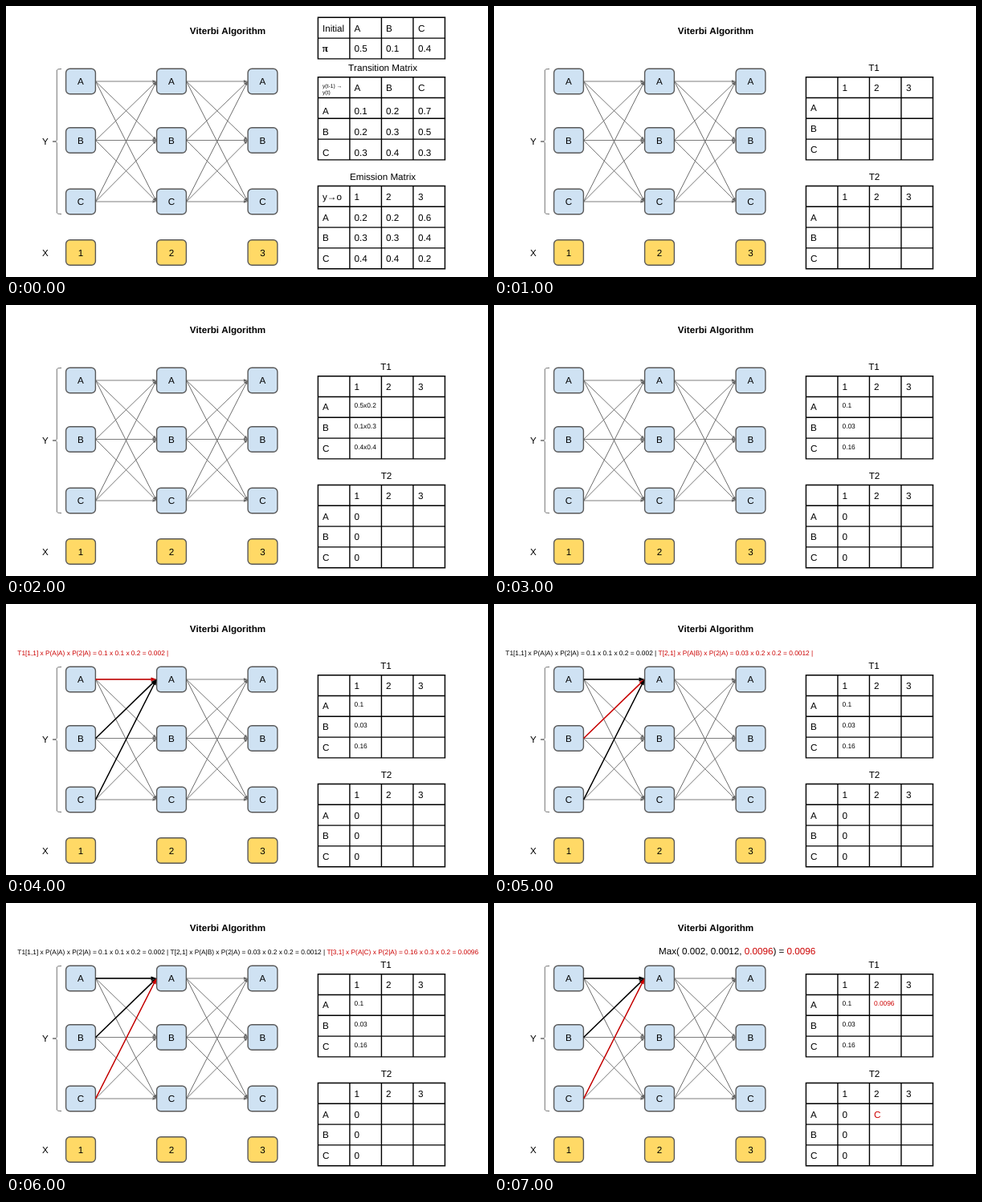
Recreate the animation shown at these times as an HTML page. Size 600 by 338 pixels, loop 8000 ms.

```html
<!DOCTYPE html>
<html lang="en">
<head>
<meta charset="utf-8">
<title>Viterbi Algorithm</title>
<style>
  html, body { margin: 0; width: 100%; height: 100%; overflow: hidden; background: #fff; }
  svg { display: block; width: 100vw; height: 100vh; }
  text {
    font-family: "Liberation Sans", Arial, sans-serif;
    font-kerning: none; text-rendering: geometricPrecision; white-space: pre;
  }
</style>
</head>
<body>
<svg id="stage" viewBox="0 0 600 338"></svg>
<script>
const stage = document.getElementById('stage');
const RED = '#cc0000', GRAY = '#666', BLACK = '#000';
const BODY = 11.65, SMALL = 8.33;
const nodeX = [93, 206, 319.5], nodeY = [94, 167.5, 244];
const cellX = [394, 433.5, 473, 513];
const letters = ['A', 'B', 'C'], digits = ['1', '2', '3'];

const text = (x, y, s, { size = BODY, fill = BLACK, extra = '' } = {}) =>
  `<text x="${x}" y="${y}" font-size="${size}" fill="${fill}" ${extra}>${s}</text>`;
const centered = (x, y, s, extra = '') =>
  text(x, y, s, { extra: `text-anchor="middle" ${extra}` });
const span = (s, fill) => `<tspan fill="${fill}">${s}</tspan>`;

function node(x, y, label, fill) {
  return `<rect x="${x - 18.4}" y="${y - 15.7}" width="36.8" height="31.4" rx="5"
    fill="${fill}" stroke="#595959" stroke-width="1.4"/>` + centered(x, y + 4.4, label);
}

function arrow(x1, y1, x2, y2, color, width, head) {
  const angle = Math.atan2(y2 - y1, x2 - x1) * 180 / Math.PI;
  const length = Math.hypot(x2 - x1, y2 - y1);
  return `<g transform="translate(${x1} ${y1}) rotate(${angle})" fill="${color}">
    <path d="M0 0H${length - head}" stroke="${color}" stroke-width="${width}"/>
    <path d="M${length} 0l${-head} ${-head * .37}v${head * .74}z"/></g>`;
}

function edge(column, from, to, color = GRAY, width = 0.85, head = 5) {
  return arrow(nodeX[column] + 18.6, nodeY[from], nodeX[column + 1] - 18.6, nodeY[to], color, width, head);
}

function grid(top, rows) {
  const bottom = top + rows * 25.8;
  let d = '';
  for (let i = 0; i <= rows; i++) d += `M387.7 ${top + i * 25.8}H547.2`;
  for (let i = 0; i <= 4; i++) d += `M${388.4 + i * 39.5} ${top}V${bottom}`;
  return `<path d="${d}" fill="none" stroke="#000" stroke-width="1.4"/>`;
}

const row = (y, cells, style) => cells.map((s, i) => s && text(cellX[i], y, s, style)).join('');
const rows = (y, table) => table.map((cells, i) => row(y + i * 25.8, cells)).join('');
const column = (i, y, values, style) =>
  values.map((s, k) => text(cellX[i], y + k * 25.8, s, style)).join('');

function trellis() {
  let out = centered(276, 35.3, 'Viterbi Algorithm', 'font-weight="bold"');
  out += centered(49, 172.5, 'Y') + centered(49, 311.5, 'X');
  out += `<path d="M69 78.5Q63.3 78.5 63.3 80V167.5Q63.3 169 58 169Q63.3 169 63.3 170.5V258Q63.3 259.5 69 259.5"
    fill="none" stroke="${GRAY}" stroke-width=".9"/>`;
  for (let c = 0; c < 2; c++)
    for (let from = 0; from < 3; from++)
      for (let to = 0; to < 3; to++) out += edge(c, from, to);
  nodeX.forEach((x, c) => {
    nodeY.forEach((y, r) => out += node(x, y, letters[r], '#cfe2f3'));
    out += node(x, 307.5, digits[c], '#ffd966');
  });
  return out + grid(88.7, 4) + grid(224.5, 4);
}

function matrices() {
  return grid(14.3, 2) +
    row(31.5, ['Initial', ...letters]) +
    row(57.3, ['', '0.5', '0.1', '0.4']) +
    text(393.7, 57, 'π', { size: 13, extra: 'font-weight="bold" style="font-family:\'Liberation Serif\',serif"' }) +
    centered(469, 81, 'Transition Matrix') +
    text(394, 102, 'y(t-1) →', { size: 6.7 }) + text(394, 110, 'y(t)', { size: 6.7 }) +
    rows(106, [['', ...letters], [], [], []]) +
    rows(135.3, [['A', '0.1', '0.2', '0.7'], ['B', '0.2', '0.3', '0.5'], ['C', '0.3', '0.4', '0.3']]) +
    centered(469, 217.3, 'Emission Matrix') +
    rows(241.8, [['y→o', ...digits], ['A', '0.2', '0.2', '0.6'],
      ['B', '0.3', '0.3', '0.4'], ['C', '0.4', '0.4', '0.2']]);
}

const terms = [
  'T1[1,1] x P(A|A) x P(2|A) = 0.1 x 0.1 x 0.2 = 0.002 | ',
  'T[2,1] x P(A|B) x P(2|A) = 0.03 x 0.2 x 0.2 = 0.0012 | ',
  'T[3,1] x P(A|C) x P(2|A) = 0.16 x 0.3 x 0.2 = 0.0096',
];

function results(step) {
  let out = centered(473, 80.7, 'T1') + row(106, ['', ...digits]) + column(0, 131.3, letters) +
    centered(473.5, 217.3, 'T2') + row(241.8, ['', ...digits]) + column(0, 267.6, letters);
  if (step >= 2) {
    const values = step === 2 ? ['0.5x0.2', '0.1x0.3', '0.4x0.4'] : ['0.1', '0.03', '0.16'];
    out += column(1, 128.2, values, { size: SMALL }) + column(1, 267.6, ['0', '0', '0']);
  }
  if (step >= 4) {
    const active = Math.min(step - 4, 2);
    for (let from = 0; from < 3; from++)
      out += edge(0, from, 0, from === active ? RED : BLACK, 1.5, 7);
    if (step < 7) {
      const shown = terms.slice(0, active + 1);
      out += text(14.3, 63.7, shown.map((s, i) => span(s, i === active ? RED : BLACK)).join(''), { size: SMALL });
    }
  }
  if (step === 7) {
    const best = span('0.0096', RED);
    out += text(205, 64, `Max( 0.002, 0.0012, ${best}) = ${best}`) +
      text(cellX[2], 128.2, '0.0096', { size: SMALL, fill: RED }) +
      text(cellX[2], 267.6, 'C', { fill: RED });
  }
  return out;
}

let current = -1;
function draw() {
  const step = Math.floor(performance.now() % 8000 / 1000);
  if (step !== current) {
    current = step;
    stage.innerHTML = trellis() + (step ? results(step) : matrices());
  }
  requestAnimationFrame(draw);
}
draw();
</script>
</body>
</html>
```
